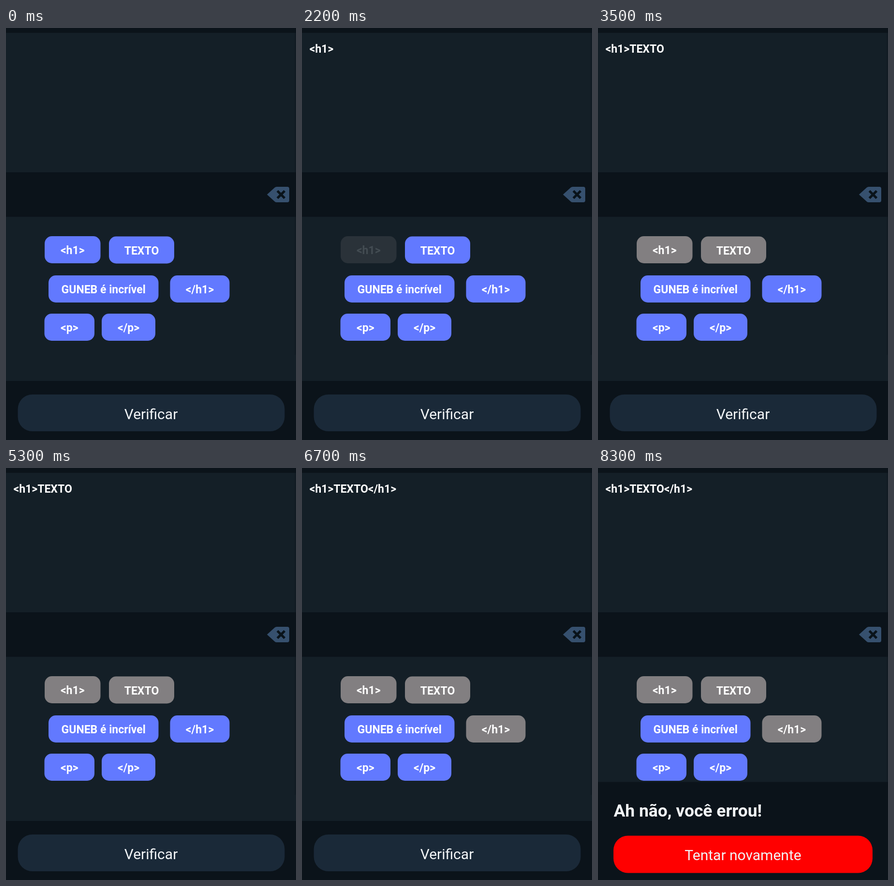
Write an HTML page that moves like this. It is 600 by 851 pixels and loops after 8900 ms.

```html
<!DOCTYPE html>
<html lang="pt">
<head>
<meta charset="utf-8">
<title>Exercício</title>
<style>
html, body { margin: 0; width: 100%; height: 100%; overflow: hidden; background: #0b131a; }
svg { display: block; width: 100%; height: 100%; font-family: Roboto, sans-serif; }
.code { font-size: 23px; font-weight: 700; fill: #fff; }
.label { font-size: 30px; fill: #f2f5f7; }
.mid { text-anchor: middle; }
</style>
</head>
<body>
<svg viewBox="0 0 600 851">
  <rect width="600" height="851" fill="#0b131a"/>
  <rect y="10" width="600" height="288" fill="#141f27"/>
  <rect y="390" width="600" height="339" fill="#141f27"/>
  <rect x="597" y="10" width="3" height="288" fill="#111b23"/>
  <rect x="597" y="390" width="3" height="285" fill="#111b23"/>
  <text id="editor" class="code" x="15.5" y="50.5"></text>
  <path d="M540 344L556 329.500Q557.700 328 560 328H582Q586 328 586 332V356Q586 360 582 360H560Q557.700 360 556 358.500Z" fill="#36506e"/>
  <path d="M561.500 336.500L576.500 351.500M576.500 336.500L561.500 351.500" stroke="#0a131a" stroke-width="5"/>
  <g id="chips"></g>
  <g id="verify">
    <rect x="24.500" y="757" width="552" height="76" rx="30" fill="#1a2938"/>
    <text class="label mid" x="300" y="807.500">Verificar</text>
  </g>
  <g id="sheet">
    <rect y="648.500" width="600" height="203" fill="#0b131a"/>
    <text x="32.500" y="719.500" font-size="35.400" font-weight="700" fill="#f2f5f7">Ah não, você errou!</text>
    <rect x="32" y="759.500" width="536" height="77" rx="30" fill="#f00"/>
    <text class="label mid" x="300" y="810">Tentar novamente</text>
  </g>
</svg>
<script>
const LOOP = 8900, BLUE = '#6279ff', GREY = '#827f81';
const $ = id => document.getElementById(id);
const clamp = v => Math.max(0, Math.min(1, v));
const ease = p => p < .5 ? 2 * p * p : 1 - 2 * (1 - p) ** 2;

// press: finger down, release: text is typed and the chip turns grey
const chips = [
  { text: '<h1>', x: 80, y: 430, w: 115.5, press: 2000, release: 2200 },
  { text: 'TEXTO', x: 213, y: 430.5, w: 135, press: 3020, release: 3260 },
  { text: 'GUNEB é incrível', x: 88, y: 511, w: 227.5 },
  { text: '</h1>', x: 339.5, y: 511, w: 123, press: 5420, release: 5650 },
  { text: '<p>', x: 79.5, y: 590, w: 103.5 },
  { text: '</p>', x: 198, y: 590, w: 111 }
];
const verify = { press: 7020, release: 7300 };

function add(parent, tag, attrs, text) {
  const el = document.createElementNS('http://www.w3.org/2000/svg', tag);
  for (const key in attrs) el.setAttribute(key, attrs[key]);
  if (text) el.textContent = text;
  return parent.appendChild(el);
}

for (const c of chips) {
  c.group = add($('chips'), 'g', {});
  c.box = add(c.group, 'rect', { x: c.x, y: c.y, width: c.w, height: 56, rx: 15, fill: BLUE });
  add(c.group, 'text', { class: 'code mid', x: c.x + c.w / 2, y: c.y + 37 }, c.text);
}

function touchOpacity(t, { press, release }) {
  if (!press) return 1;
  const down = clamp((t - press) / 70), up = clamp((t - release) / 250);
  return 1 - .8 * ease(down) * (1 - ease(up));
}

function render(t) {
  let typed = '';
  for (const c of chips) {
    const used = c.release && t >= c.release;
    if (used) typed += c.text;
    c.box.setAttribute('fill', used ? GREY : BLUE);
    c.group.setAttribute('opacity', touchOpacity(t, c));
  }
  if ($('editor').textContent !== typed) $('editor').textContent = typed;
  $('verify').setAttribute('opacity', touchOpacity(t, verify));
  const rise = 1 - (1 - clamp((t - 7240) / 260)) ** 2;
  $('sheet').setAttribute('transform', `translate(0 ${203 * (1 - rise)})`);
}

const start = performance.now();
function tick() {
  render((performance.now() - start) % LOOP);
  requestAnimationFrame(tick);
}
tick();
</script>
</body>
</html>
```
